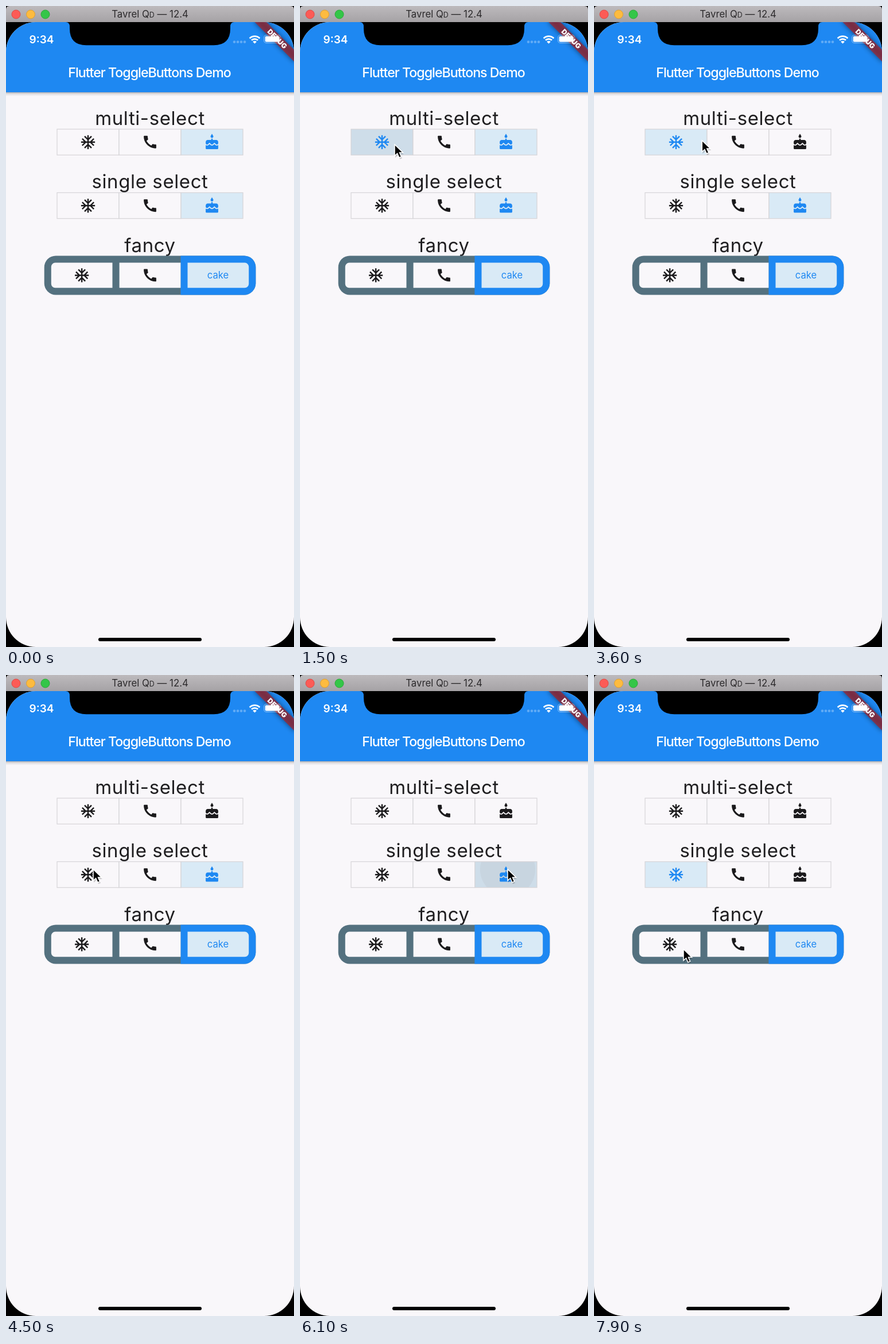
Animation of 502 by 1115 pixels, one loop 8 s. Source, as an HTML page:

```html
<!DOCTYPE html>
<html lang="en">
<head>
<meta charset="utf-8">
<title>ToggleButtons demo</title>
<style>
  html, body { margin: 0; width: 100%; height: 100%; overflow: hidden; background: #000; }
  svg { display: block; width: 100vw; height: 100vh; font-family: Inter, "Open Sans", sans-serif; }
  text { text-anchor: middle; }
  .heading { font-size: 33px; letter-spacing: .6px; fill: #1f1e20; }
  .cell { color: #1b1a1c; }
  .cell.on { color: #1e88f2; }
  .cell .face { fill: #f9f7fa; }
  .cell.on .face { fill: #d9eaf6; }
  .cell .edge { fill: none; stroke: #d6d4d8; stroke-width: 1.2; }
  .icon { fill: currentColor; }
  .soft { filter: blur(4px); }
</style>
</head>
<body>
<svg viewBox="0 0 502 1115" preserveAspectRatio="none">
  <defs>
    <linearGradient id="bar" x2="0" y2="1">
      <stop stop-color="#bdbabd"/><stop offset="1" stop-color="#a5a2a5"/>
    </linearGradient>
    <linearGradient id="shade" x2="0" y2="1">
      <stop stop-color="#000" stop-opacity=".3"/>
      <stop offset=".4" stop-color="#000" stop-opacity=".1"/>
      <stop offset="1" stop-color="#000" stop-opacity="0"/>
    </linearGradient>
    <clipPath id="screen"><rect y="28" width="502" height="1087" rx="52"/></clipPath>
    <path id="snow" class="icon" d="M22 11h-4.17l3.24-3.24-1.41-1.42L15 11h-2V9l4.66-4.66-1.42-1.41L13 6.17V2h-2v4.17L7.76 2.93 6.34 4.34 11 9v2H9L4.34 6.34 2.93 7.76 6.17 11H2v2h4.17l-3.24 3.24 1.41 1.42L9 13h2v2l-4.66 4.66 1.42 1.41L11 17.83V22h2v-4.17l3.24 3.24 1.42-1.41L13 15v-2h2l4.66 4.66 1.41-1.42L17.83 13H22z"/>
    <path id="call" class="icon" d="M20.01 15.38c-1.23 0-2.42-.2-3.53-.56-.35-.12-.74-.03-1.01.24l-1.57 1.97c-2.83-1.35-5.48-3.9-6.89-6.83l1.95-1.66c.27-.28.35-.67.24-1.02-.37-1.11-.56-2.3-.56-3.53 0-.54-.45-.99-.99-.99H4.19C3.65 3 3 3.24 3 3.99 3 13.28 10.73 21 20.01 21c.71 0 .99-.63.99-1.18v-3.45c0-.54-.45-.99-.99-.99z"/>
    <g id="cake" class="icon">
      <path d="M12 6c1.11 0 2-.9 2-2 0-.38-.1-.73-.29-1.03L12 0l-1.71 2.97c-.19.3-.29.65-.29 1.03 0 1.1.9 2 2 2z"/>
      <path d="M16.6 15.99l-1.07-1.07-1.08 1.07c-1.3 1.3-3.58 1.31-4.89 0l-1.07-1.07-1.09 1.07C6.75 16.64 5.88 17 4.96 17c-.73 0-1.4-.23-1.96-.61V21c0 .55.45 1 1 1h16c.55 0 1-.45 1-1v-4.61c-.56.38-1.23.61-1.96.61-.92 0-1.79-.36-2.44-1.01z"/>
      <path d="M18 9h-5V7h-2v2H6c-1.66 0-3 1.34-3 3v1.54c0 1.08.88 1.96 1.96 1.96.52 0 1.02-.2 1.38-.57l2.14-2.13 2.13 2.13c.74.74 2.03.74 2.77 0l2.14-2.13 2.13 2.13c.37.37.86.57 1.38.57 1.08 0 1.96-.88 1.96-1.96V12C21 10.34 19.66 9 18 9z"/>
    </g>
  </defs>

  <!-- window title bar -->
  <path d="M0 28V6Q0 0 6 0H496Q502 0 502 6V28Z" fill="url(#bar)"/>
  <g stroke-width="1">
    <circle cx="17.5" cy="14.5" r="7.5" fill="#fc5b56" stroke="#de4743"/>
    <circle cx="43" cy="14.5" r="7.5" fill="#fdbb3f" stroke="#dd9e33"/>
    <circle cx="68.5" cy="14.5" r="7.5" fill="#34c648" stroke="#27a935"/>
  </g>
  <text x="251" y="20.3" font-size="16.8" fill="#2b292b">Tavrel Q<tspan font-size="12.5">D</tspan> — 12.4</text>

  <g clip-path="url(#screen)">
    <rect y="28" width="502" height="1087" fill="#f9f7fa"/>
    <rect y="150" width="502" height="7" fill="url(#shade)"/>
    <rect y="28" width="502" height="122" fill="#1e88f2"/>
    <text x="250" y="124" font-size="23.2" font-weight="500" letter-spacing="-1" fill="#fff">Flutter ToggleButtons Demo</text>

    <text class="heading" x="251" y="206.5">multi-select</text>
    <text class="heading" x="251" y="317">single select</text>
    <text class="heading" x="251" y="427.5">fancy</text>
    <g id="rows"></g>

    <!-- fancy row -->
    <rect x="66.7" y="434.5" width="368.6" height="67.9" rx="20" fill="#54717f"/>
    <path d="M304.4 434.5H415.3a20 20 0 0 1 20 20V482.4a20 20 0 0 1 -20 20H304.4Z" fill="#1e88f2"/>
    <path d="M185.500 446.600H85.800a7 7 0 0 0 -7 7V483.300a7 7 0 0 0 7 7H185.500ZM197.600 446.600H304.400V490.300H197.600Z" fill="#f9f7fa"/>
    <path d="M316.500 446.600H416.200a7 7 0 0 1 7 7V483.300a7 7 0 0 1 -7 7H316.500Z" fill="#d9eaf6"/>
    <g class="cell">
      <use href="#snow" transform="translate(117.6 453.9) scale(1.2126)"/>
      <use href="#call" transform="translate(236.45 453.9) scale(1.2126)"/>
    </g>
    <text x="369.5" y="474" font-size="16.6" fill="#1e88f2">cake</text>

    <!-- debug ribbon -->
    <g transform="translate(502 28) rotate(45) scale(1.2126)">
      <rect class="soft" x="-41" y="28" width="82" height="12" fill-opacity=".5"/>
      <rect x="-41" y="28" width="82" height="12" fill="#b71c1c" fill-opacity=".63"/>
      <text y="37.6" font-size="10" font-weight="900" fill="#fff">DEBUG</text>
    </g>

    <!-- status bar -->
    <text x="62" y="65" font-size="19" font-weight="600" fill="#fff">9:34</text>
    <g fill="#fff" fill-opacity=".3">
      <circle cx="398" cy="62.5" r="2.3"/><circle cx="404" cy="62.5" r="2.3"/>
      <circle cx="410" cy="62.5" r="2.3"/><circle cx="416" cy="62.5" r="2.3"/>
    </g>
    <g fill="none" stroke="#fff" stroke-width="2.8">
      <path d="M424.7 56.3A12.5 12.5 0 0 1 442.3 56.3M428 59.6A7.8 7.8 0 0 1 439 59.6"/>
      <path d="M433.5 65.5L430.2 62.2A4.7 4.7 0 0 1 436.8 62.2Z" fill="#fff" stroke="none"/>
    </g>
    <rect x="449.7" y="50.7" width="29" height="13.6" rx="4" fill="none" stroke="#fff" stroke-opacity=".4" stroke-width="1.2"/>
    <rect x="451.7" y="52.5" width="25" height="10" rx="2.2" fill="#fff"/>
  </g>
  <path d="M104 28Q111 28 111 36V39Q111 68.300 140 68.300H362Q391 68.300 391 39V36Q391 28 398 28Z"/>
  <rect x="161" y="1099" width="180" height="6" rx="3"/>

  <g id="cursor" display="none">
    <path d="M1 3V23L6 18.5L9 25.5L13 24L10 17H16Z" opacity=".18"/>
    <path d="M0 0V19.5L4.6 15.4L7.8 22.8L11.6 21.2L8.5 14H14.5Z" stroke="#fff" stroke-width="1.5"/>
  </g>
</svg>
<script>
const LOOP = 8000, STEP = 100;
const ROW_TOP = [214.2, 324.7], LEFT = 89, CELL_W = 108, CELL_H = 45;
const ICONS = ["snow", "call", "cake"];

// Resting points of the pointer: time, x, y
const PATH = [
  [300, 502, 668], [1200, 165, 241], [1500, 165, 241],
  [1900, 262, 238], [2050, 262, 238], [2700, 377, 234.4], [2800, 377, 234.4],
  [3100, 262, 236], [3200, 262, 236], [3850, 152, 233], [4000, 152, 233],
  [4500, 152, 338], [4750, 152, 338], [5360, 256, 334.7], [5500, 256, 334.7],
  [5900, 362, 338], [6100, 362, 338], [6500, 255, 336], [6650, 255, 336],
  [7000, 156, 332.2], [7250, 156, 332.2], [7900, 156, 477]
];
// Presses: time, row, column
const PRESSES = [
  [1250, 0, 0], [1950, 0, 1], [2700, 0, 2], [3150, 0, 1], [3900, 0, 0],
  [4600, 1, 0], [5400, 1, 1], [6000, 1, 2], [6550, 1, 1], [7100, 1, 0]
];

const clamp = v => Math.min(1, Math.max(0, v));
const smooth = p => p * p * (3 - 2 * p);
const cursor = document.getElementById("cursor");
const rows = document.getElementById("rows");

rows.innerHTML = ROW_TOP.map((y, r) => ICONS.map((icon, c) => {
  const x = LEFT + c * CELL_W;
  const box = `x="${x}" y="${y}" width="${CELL_W}" height="${CELL_H}"`;
  return `<g class="cell">
    <clipPath id="clip${r}${c}"><rect ${box}/></clipPath>
    <rect class="face" ${box}/>
    <rect class="glow" ${box} fill="#b0bac6" opacity="0"/>
    <circle class="ripple" fill="#b8c0ca" opacity="0" clip-path="url(#clip${r}${c})"/>
    <rect class="edge" ${box}/>
    <use href="#${icon}" transform="translate(${x + 39.45} ${y + 8}) scale(1.2126)"/>
  </g>`;
}).join("")).join("");

const cells = [...rows.children].map(el => ({
  el, glow: el.querySelector(".glow"), ripple: el.querySelector(".ripple")
}));

function pointerAt(t) {
  let i = PATH.findIndex(k => k[0] > t);
  if (i < 0) i = PATH.length;
  const a = PATH[Math.max(0, i - 1)], b = PATH[Math.min(i, PATH.length - 1)];
  const p = b === a ? 0 : smooth(clamp((t - a[0]) / (b[0] - a[0])));
  return [a[1] + (b[1] - a[1]) * p, a[2] + (b[2] - a[2]) * p];
}

function draw(t) {
  const [x, y] = pointerAt(t);
  cursor.setAttribute("display", t > PATH[0][0] ? "inline" : "none");
  cursor.setAttribute("transform", `translate(${x} ${y})`);

  const selected = [[false, false, true], [false, false, true]];
  const age = cells.map(() => -1);
  const spot = [];
  for (const [at, row, col] of PRESSES) {
    if (t < at) break;
    age[row * 3 + col] = t - at;
    spot[row * 3 + col] = pointerAt(at);
    if (t < at + STEP) continue;
    if (row === 0) selected[0][col] = !selected[0][col];
    else selected[1] = selected[1].map((_, i) => i === col);
  }

  cells.forEach(({ el, glow, ripple }, i) => {
    const a = age[i], active = a >= 0;
    el.classList.toggle("on", selected[Math.floor(i / 3)][i % 3]);
    glow.setAttribute("opacity", active ? 0.28 * clamp(a / 100) * clamp((350 - a) / 100) : 0);
    ripple.setAttribute("opacity", active ? 0.3 * clamp((250 - a) / 150) : 0);
    if (!active) return;
    ripple.setAttribute("cx", spot[i][0]);
    ripple.setAttribute("cy", spot[i][1]);
    ripple.setAttribute("r", 12 + 90 * clamp(a / 250));
  });
}

const start = performance.now();
function tick() {
  const t = (performance.now() - start) % LOOP;
  draw(Math.floor(t / STEP) * STEP);
  requestAnimationFrame(tick);
}
tick();
</script>
</body>
</html>
```
